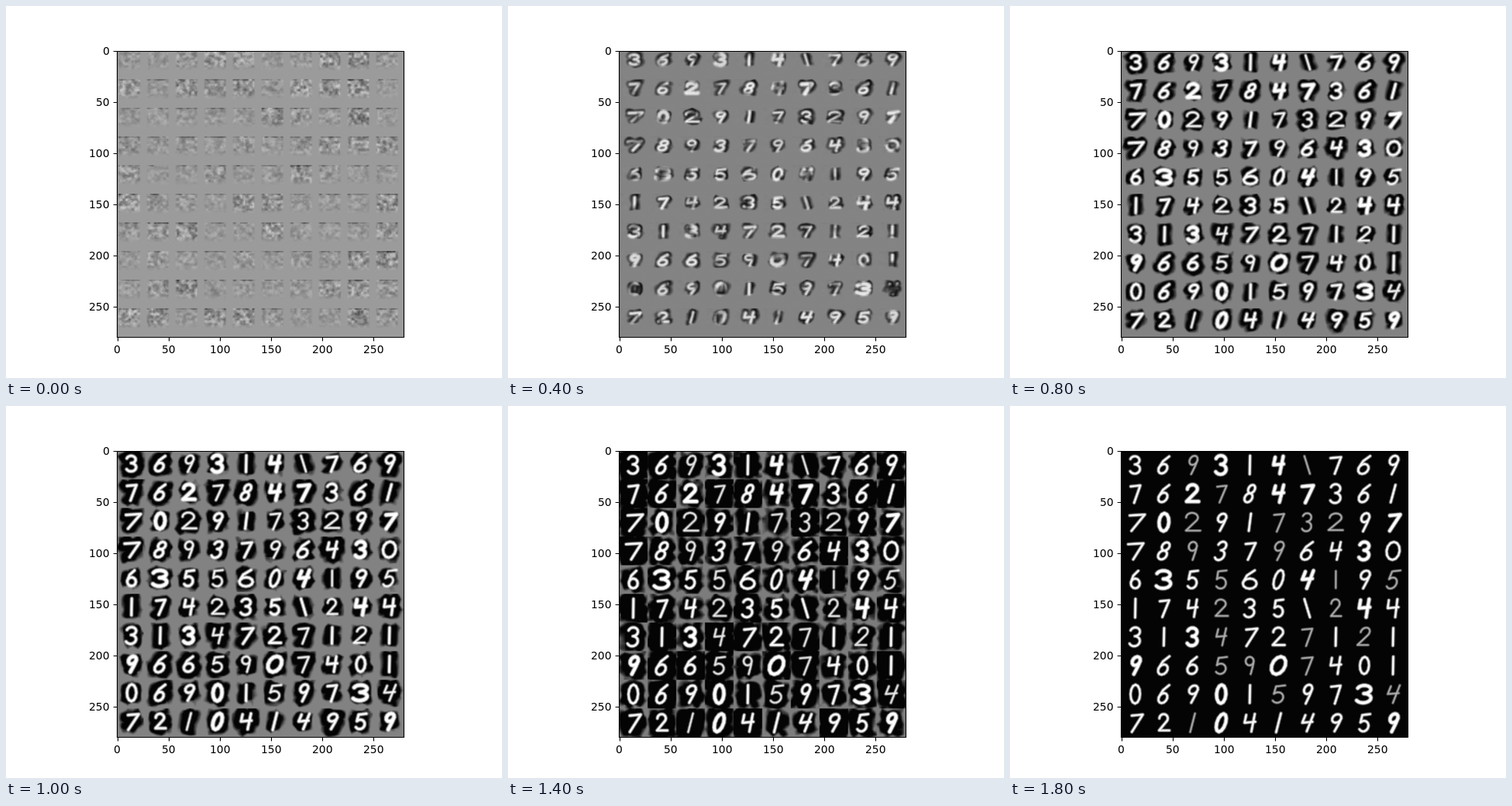
Animation of 640 by 480 pixels, one loop 2000 ms. Source, as an HTML page with a canvas:

```html
<!DOCTYPE html>
<html lang="en">
<head>
<meta charset="utf-8">
<title>Digit grid</title>
<style>
  html, body { margin: 0; width: 100%; height: 100%; overflow: hidden; background: #fff; }
  canvas, svg { position: absolute; left: 0; top: 0; width: 640px; height: 480px; }
  text { font: 13.89px "DejaVu Sans", sans-serif; }
</style>
</head>
<body>
<canvas id="stage" width="640" height="480"></canvas>
<svg id="axes" viewBox="0 0 640 480"></svg>
<script>
const start = performance.now();
const STEP = 200, STEPS = 10, N = 10, CELL = 28, SIZE = N * CELL;
const BOX = { x: 143.2, y: 57.6, size: 369.6 };
const UNIT = BOX.size / SIZE;

// Pen strokes around the cell centre; arc angles are in turns, clockwise from the right
const line = (...p) => p;
const arc = (cx, cy, rx, ry, from, to) => Array.from({ length: 13 }, (_, i) => {
  const a = 2 * Math.PI * (from + (to - from) * i / 12);
  return [cx + rx * Math.cos(a), cy + ry * Math.sin(a)];
});

const GLYPHS = {
  0: [arc(0, 0, 4.5, 9, 0, 1)],
  1: [line([0, -9], [0, 9])],
  2: [arc(-.5, -4.5, 4.5, 4.5, -.5, .1).concat(line([-5, 8], [6, 8]))],
  3: [arc(-.5, -4.8, 4.5, 4.2, -.45, .25), arc(-.5, 4.2, 5, 4.8, -.25, .42)],
  4: [line([-4, -8], [-5, 0], [5, -1]), line([4, -9], [2, 9])],
  5: [line([5, -9], [-3, -8]).concat(arc(-.5, 3.5, 5, 5.5, -.38, .4))],
  6: [line([3, -9], [-2, -4], [-4.5, 3]), arc(0, 4, 4.5, 5, 0, 1)],
  7: [line([-5, -7], [5, -8], [-1, 9])],
  8: [arc(.5, -4.7, 3.5, 4.3, 0, 1), arc(-.3, 4.3, 4, 4.7, 0, 1)],
  9: [arc(-.3, -4.5, 4.2, 4.5, 0, 1), line([4, -5], [3, 1], [1, 9])],
  hook: [arc(-5, 6, 9, 11, -.25, 0)]
};

// Digit plus style: + bold, - faint, / lean right, < lean left, | upright, w wide
const GRID = `
  3   6/  9-/ 3+  1|  4+  1<- 7   6/  9/
  7|  6/  2+  7-  8/  4+  7+  3   6/  1/
  7w/ 0+  2-w 9/  1   7-  3-  2-w 9/  7+/
  7w  8/  9-  3/  7   9-/ 6/  4   3+  0w
  6   3+w 5   5-  6w  0/  4+/ 1-  9/  5-/
  1|  7   4   2-  3   5   1<  2-  4+  4
  3   1|  3+  4-  7/  2   7-  1|  2-/ 1|
  9+/ 6/  6   5-  9-  0+w/ 7-| 4  0   1|
  0   6/  9/  0+  1|  5-  9/  7   3+w 4-/
  7/  2   1/- 0+/ 4   1/  4/  9/  5   9+/`.trim().split(/\s+/);

const clamp = v => Math.max(0, Math.min(1, v));
const mix = (a, b, k) => a + (b - a) * k;
const ease = k => k * k * (3 - 2 * k);

function rand(a, b = 0, c = 0) {
  let h = Math.imul(a + 11, 374761393) ^ Math.imul(b + 7, 668265263) ^ Math.imul(c + 3, 1274126177);
  h = Math.imul(h ^ (h >>> 13), 1103515245);
  h = Math.imul(h ^ (h >>> 16), 668265263);
  return ((h ^ (h >>> 15)) >>> 0) / 4294967296;
}

// Smooth noise between -1 and 1
function noise(seed, x, y) {
  const i = Math.floor(x), j = Math.floor(y), u = x - i, v = y - j;
  return 2 * mix(mix(rand(seed, i, j), rand(seed, i + 1, j), u),
                 mix(rand(seed, i, j + 1), rand(seed, i + 1, j + 1), u), v) - 1;
}

function segments(shape, place) {
  const segs = [];
  for (const stroke of GLYPHS[shape]) {
    const pts = stroke.map(place);
    for (let i = 1; i < pts.length; i++) {
      const [x, y] = pts[i - 1], dx = pts[i][0] - x, dy = pts[i][1] - y;
      segs.push({ x, y, dx, dy, len: dx * dx + dy * dy || 1 });
    }
  }
  return segs;
}

function distance(segs, x, y) {
  let best = 1e9;
  for (const s of segs) {
    const px = x - s.x, py = y - s.y;
    const t = clamp((px * s.dx + py * s.dy) / s.len);
    const ex = px - t * s.dx, ey = py - t * s.dy;
    best = Math.min(best, ex * ex + ey * ey);
  }
  return Math.sqrt(best);
}

// Start texture in the upper left of a cell, with a dark top edge
function texture(id, x, y) {
  const inside = clamp(x / 2) * clamp((23 - x) / 2) * clamp((19 - y) / 6);
  const n = noise(id + 200, x / 3, y / 2.5) + .5 * noise(id + 500, x / 1.5, y / 1.5) - .15;
  const edge = y === 0 ? -60 * rand(id + 300, x >> 2) : 0;
  return inside * (edge + (22 + 34 * rand(id, 4) ** 2) * n);
}

// Everything that changes over the loop, as rules of the step number
function phase(step) {
  const t = step / (STEPS - 1), raw = 4 ** -step, grow = ease(clamp(step / 7)), flood = t ** 6;
  return {
    t, raw, grow, flood,
    grey: mix(130 + 25 * raw, 4, flood * flood),
    cx: 15.5 - 1.5 * grow,
    cy: 7.5 + 6.5 * grow,
    scale: .45 + .55 * grow,
    ink: 1 - raw,
    shift: 9 * raw,
    reach: 2.6 + 6 * grow + 30 * flood,
    haloW: 7.5 + 3 * grow + 9 * flood,
    haloH: 5 + 6.5 * grow + 9 * flood
  };
}

function drawCell(data, id, step) {
  const p = phase(step);
  const mark = GRID[id], digit = mark[0], has = c => mark.includes(c);
  const lean = has('/') ? .26 : has('<') ? -.3 : has('|') ? .02 : .12 * rand(id, 1);
  const wide = (has('w') ? 1.4 : 1) * (.9 + .2 * rand(id, 2)) * mix(.75, 1, p.scale);
  const tall = p.scale * (.92 + .12 * rand(id, 3));
  const half = (has('+') ? 1.8 : has('-') ? .95 : 1.25) + .5 * (1 - p.t);
  const soft = 2.6 - 1.2 * p.grow;
  const amp = 1 - 2.2 * p.raw * rand(id, 5);
  const white = has('-') ? mix(255, 185, p.flood) : 255;
  const shape = step < 2 && digit !== '1' ? 'hook' : digit;
  const segs = segments(shape, ([x, y]) =>
    [p.cx + x * wide - y * lean * p.scale, p.cy + y * tall]);
  const spread = .88 + .4 * rand(id, 6) ** 2 + (has('w') ? .12 : 0);
  const ox = id % N * CELL, oy = Math.floor(id / N) * CELL;

  for (let y = 0; y < CELL; y++) for (let x = 0; x < CELL; x++) {
    let v = p.grey + p.raw * texture(id, x, y) + p.raw * ((x + y) % 2 * 4 - 2);
    if (step) {
      const px = x + .5, py = y + .5, hx = px - p.shift, hy = py + p.shift;
      const d = distance(segs, px, py);
      const dh = p.shift > .2 ? distance(segs, hx, hy) : d;
      const n = noise(id, x / 5, y / 5);
      const q = Math.hypot(((hx - p.cx) / p.haloW) ** 2, ((hy - p.cy) / p.haloH) ** 2);
      const box = clamp((spread + .25 * n - Math.sqrt(q)) * 4 + .5);
      const near = clamp((p.reach + 1.5 * n - dh) / 4 + .5);
      const whole = clamp(.6 + 2 * p.grow + noise(id + 700, x / 6, y / 6));
      v = mix(v, 4, p.ink * amp * box * near);
      v = mix(v, white, p.ink * amp * whole * clamp((half - d) / soft + .5));
    }
    const k = ((oy + y) * SIZE + ox + x) * 4;
    data[k] = data[k + 1] = data[k + 2] = v;
    data[k + 3] = 255;
  }
}

const cache = [];
function picture(step) {
  if (!cache[step]) {
    const c = cache[step] = document.createElement('canvas');
    c.width = c.height = SIZE;
    const g = c.getContext('2d'), img = g.createImageData(SIZE, SIZE);
    for (let id = 0; id < N * N; id++) drawCell(img.data, id, step);
    g.putImageData(img, 0, 0);
  }
  return cache[step];
}

function drawAxes() {
  let lines = 'M143.5 58.5H513.5V427.5H143.5Z', labels = '';
  const label = (v, x, y) => `<text x="${Math.round(x)}" y="${Math.round(y)}">${v}</text>`;
  for (let v = 0; v <= 250; v += 50) {
    const off = (v + .5) * UNIT, x = BOX.x + off, y = BOX.y + off;
    const width = 8.84 * String(v).length;
    lines += `M${Math.round(x) + .5} 427.5v4.9M143.5 ${Math.round(y) + .5}h-4.9`;
    labels += label(v, x - width / 2, 448) + label(v, 133.5 - width, y + 5.06);
  }
  document.getElementById('axes').innerHTML =
    `<path d="${lines}" fill="none" stroke="#000" stroke-width="1.11"/>${labels}`;
}

const ctx = document.getElementById('stage').getContext('2d');
ctx.imageSmoothingQuality = 'high';
let shown = -1;

function tick() {
  const step = Math.floor((performance.now() - start) / STEP) % STEPS;
  if (step !== shown) {
    ctx.clearRect(0, 0, 640, 480);
    ctx.drawImage(picture(step), BOX.x, BOX.y, BOX.size, BOX.size);
    shown = step;
  }
  requestAnimationFrame(tick);
}

drawAxes();
tick();
</script>
</body>
</html>
```
